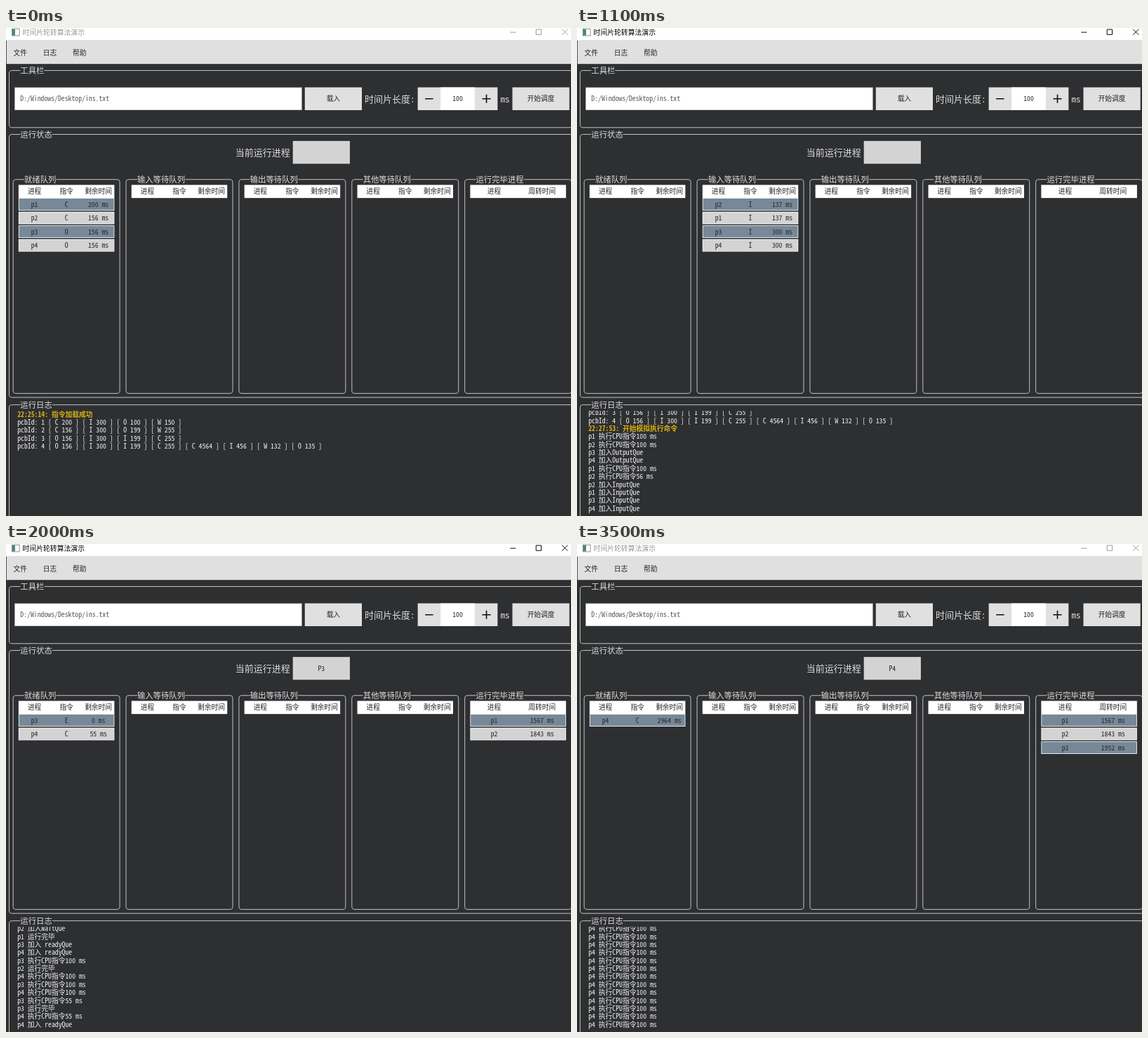
An HTML page that plays this animation: 805x695 px, repeating every 3.6 s.

```html
<!DOCTYPE html>
<html lang="zh-CN">
<head>
<meta charset="utf-8">
<title>时间片轮转算法演示</title>
<style>
  html, body { margin: 0; width: 100%; height: 100%; overflow: hidden; background: #2e2f31; }
  svg { display: block; width: 805px; height: 695px; }
  text {
    font: 12px "Noto Sans Mono CJK SC", "Noto Sans CJK SC", "Noto Sans CJK", "Noto Sans Mono", monospace;
    white-space: pre; fill: #262626;
  }
  .title { font-family: "Noto Sans CJK SC", "Noto Sans CJK", sans-serif; font-size: 12.1px; fill: #000; }
  .legend { font-size: 14px; fill: #dcdcdc; }
  .label { font-size: 16px; fill: #dcdcdc; }
  .path { fill: #555; }
  .mid { text-anchor: middle; }
  .log text { fill: #f4f4f4; }
  .log .mark { fill: #d8b212; font-weight: bold; }
  .frame { fill: none; stroke: #e6e6e6; }
  .ctl { fill: none; stroke: #000; stroke-width: 1.2; }
  .idle .title { fill: #999; }
  .idle .ctl { stroke: #999; }
</style>
</head>
<body>
<svg id="stage" viewBox="0 0 805 695" class="idle"></svg>
<script>
// The window is laid out in its own pixels and shown at 13/16 size
const SCALE = .8125;
const BG = '#2e2f31', GREY = '#e0e0e0', LIGHT = '#d3d3d3', SLATE = '#778899';
const LINE = 14, COL = 198, ROW = 24, TABLE = 168, LOG_TOP = 677, LOG_END = 842;

const rect = (x, y, w, h, fill) =>
  `<rect x="${x}" y="${y}" width="${w}" height="${h}" fill="${fill}"/>`;
const boxed = (x, y, w, h, fill, line) =>
  rect(x, y, w, h, line) + rect(x + 1, y + 1, w - 2, h - 2, fill);
const text = (x, y, s, cls = '') =>
  `<text x="${x}" y="${y}" dy=".37em" class="${cls}">${s}</text>`;
const group = (x, y, w, h, name) =>
  `<rect class="frame" x="${x + .5}" y="${y + .5}" width="${w - 1}" height="${h - 1}" rx="5"/>` +
  rect(x + 20, y - 7, name.length * 14, 15, BG) + text(x + 20, y + .5, name, 'legend');
const button = (x, y, w, h, s, fill = GREY) =>
  rect(x, y, w, h, fill) + text(x + w / 2, y + h / 2, s, 'mid');

// Cells share the table width evenly
function cells(x, y, words) {
  const w = TABLE / words.length;
  return words.map((s, i) => text(x + w * (i + .5), y, s, 'mid')).join('');
}

const queues = ['就绪队列', '输入等待队列', '输出等待队列', '其他等待队列', '运行完毕进程'];
const tableX = i => 22 + i * COL;

function titleBar() {
  return rect(0, 0, 991, 22, '#fff') +
    boxed(10, 1, 14, 13, '#fff', '#777') + rect(11, 2, 5, 11, '#4d8580') +
    text(29, 7.5, '时间片轮转算法演示', 'title') +
    '<path class="ctl" d="M884 7.5h10M929.5 2.5h9v9h-9zM975 2l10 10m0-10l-10 10"/>' +
    rect(1, 22, 990, 41, GREY) +
    ['文件', '日志', '帮助'].map((s, i) => text(13 + i * 52, 43, s)).join('');
}

function toolBar() {
  return group(5, 74, 1010, 101, '工具栏') +
    boxed(15, 104, 504, 40, '#fff', '#c4c4c4') + text(25, 124, 'D:/Windows/Desktop/ins.txt', 'path') +
    button(524, 104, 100, 40, '载入') + text(629, 124, '时间片长度:', 'label') +
    rect(722, 104, 140, 40, GREY) + button(762, 104, 60, 40, '100', '#fff') +
    '<path d="M735 124h14M835 124h15M842.5 116.5v15" stroke="#111" stroke-width="2"/>' +
    text(867, 124, 'ms', 'label') + button(888, 104, 100, 40, '开始调度');
}

function statePanel() {
  return group(5, 186, 1010, 462, '运行状态') +
    text(402, 218, '当前运行进程', 'label') + rect(503, 198, 100, 40, LIGHT) +
    queues.map((name, i) =>
      group(12 + i * COL, 265, 188, 376, name) +
      rect(tableX(i), 275, TABLE, 23, '#fff') +
      cells(tableX(i), 286.5, i < 4 ? ['进程', '指令', '剩余时间'] : ['进程', '周转时间'])
    ).join('');
}

const run = (p, ms) => `p${p} 执行CPU指令${ms} ms`;
const join = (p, q) => `p${p} 加入${q}Que`;
const done = p => `p${p} 运行完毕`;
const log = [
  '22:25:14: 指令加载成功',
  'pcbId: 1 [ C 200 ] [ I 300 ] [ O 100 ] [ W 150 ]',
  'pcbId: 2 [ C 156 ] [ I 300 ] [ O 199 ] [ W 255 ]',
  'pcbId: 3 [ O 156 ] [ I 300 ] [ I 199 ] [ C 255 ]',
  'pcbId: 4 [ O 156 ] [ I 300 ] [ I 199 ] [ C 255 ] [ C 4564 ] [ I 456 ] [ W 132 ] [ O 135 ]',
  '22:27:53: 开始模拟执行命令',
  run(1, 100), run(2, 100), join(3, 'Output'), join(4, 'Output'), run(1, 100),
  run(2, 56), join(2, 'Input'), join(1, 'Input'), join(3, 'Input'), join(4, 'Input'),
  join(2, 'Output'), join(1, 'Output'), join(1, 'Wait'), join(3, 'Input'), join(4, 'Input'),
  join(2, 'Wait'), done(1), join(3, ' ready'), join(4, ' ready'), run(3, 100), done(2),
  run(4, 100), run(3, 100), run(4, 100), run(3, 55), done(3), run(4, 55), join(4, ' ready'),
  ...Array(15).fill(run(4, 100))
];

// Log length, running process, then the five queues split by "|"
const P1 = 'p1 1567', P12 = P1 + ',p2 1843', P123 = P12 + ',p3 1952';
const states = [
  [5, '', 'p1 C 200,p2 C 156,p3 O 156,p4 O 156'],
  [6, 'P1', 'p1 C 100,p2 C 156,p3 O 156,p4 O 156'],
  [7, 'P2', 'p2 C 56,p3 O 156,p4 O 156,p1 C 100'],
  [10, 'P1', 'p1 I 300,p2 C 56||p3 O 156,p4 O 156'],
  [10, 'P1', 'p1 I 300,p2 C 56||p3 O 102,p4 O 102'],
  [11, 'P2', 'p2 I 300,p1 I 300||p3 O 47,p4 O 47'],
  [14, '', '|p2 I 246,p1 I 246|p3 O 47,p4 O 47'],
  [16, '', '|p2 I 137,p1 I 137,p3 I 300,p4 I 300'],
  [16, '', '|p2 I 28,p1 I 28,p3 I 191,p4 I 191'],
  [18, '', '|p3 I 82,p4 I 82|p2 O 118,p1 O 19'],
  [21, '', '|p3 I 172,p4 I 172|p2 O 10|p1 W 60'],
  [25, 'P3', 'p3 C 155,p4 C 255|||p2 W 81|' + P1],
  [27, 'P4', 'p4 C 155,p3 C 155||||' + P12],
  [28, 'P3', 'p3 C 55,p4 C 155||||' + P12],
  [29, 'P4', 'p4 C 55,p3 C 55||||' + P12],
  [30, 'P3', 'p3 E 0,p4 C 55||||' + P12],
  [34, 'P3', 'p3 E 0,p4 C 55||||' + P12]
];
const stateAt = k => states[k] ||
  [k + 18, 'P4', `p4 C ${4364 - (k - 17) * 100}||||${P123}`];

const stage = document.getElementById('stage');
stage.innerHTML = `<g transform="scale(${SCALE})">` +
  rect(0, 0, 991, 856, BG) + titleBar() + toolBar() + statePanel() +
  group(5, 660, 1010, 240, '运行日志') +
  '<clipPath id="view"><rect x="7" y="671" width="984" height="185"/></clipPath>' +
  '<g class="log" clip-path="url(#view)"><g id="lines">' +
  log.map((s, i) => text(20, LOG_TOP + i * LINE, s, s[0] === '2' ? 'mark' : '')).join('') +
  '</g></g><g id="live"></g></g>';
const lines = document.getElementById('lines');
const live = document.getElementById('live');

function row(x, i, item) {
  const words = item.split(' ');
  words.push(words.pop() + ' ms');
  const y = 298 + i * ROW;
  return boxed(x, y, TABLE, 22, i % 2 ? LIGHT : SLATE, '#fff') + cells(x, y + 11, words);
}

function render(k) {
  const [count, cpu, lists] = stateAt(k);
  stage.classList.toggle('idle', k === 0 || k === 31);
  live.innerHTML = text(553, 218, cpu, 'mid') + lists.split('|').map((list, q) =>
    list && list.split(',').map((item, i) => row(tableX(q), i, item)).join('')
  ).join('');
  [...lines.children].forEach((el, i) => { el.style.display = i < count ? '' : 'none'; });
  const scroll = Math.max(0, LOG_TOP + (count - 1) * LINE - LOG_END);
  lines.setAttribute('transform', `translate(0 ${-scroll})`);
}

let start, shown = 0;
function tick(now) {
  start ??= now;
  const t = (now - start) % 3600;
  const k = t < 500 ? 0 : 1 + Math.floor((t - 500) / 100);
  if (k !== shown) render(shown = k);
  requestAnimationFrame(tick);
}
render(0);
requestAnimationFrame(tick);
</script>
</body>
</html>
```
